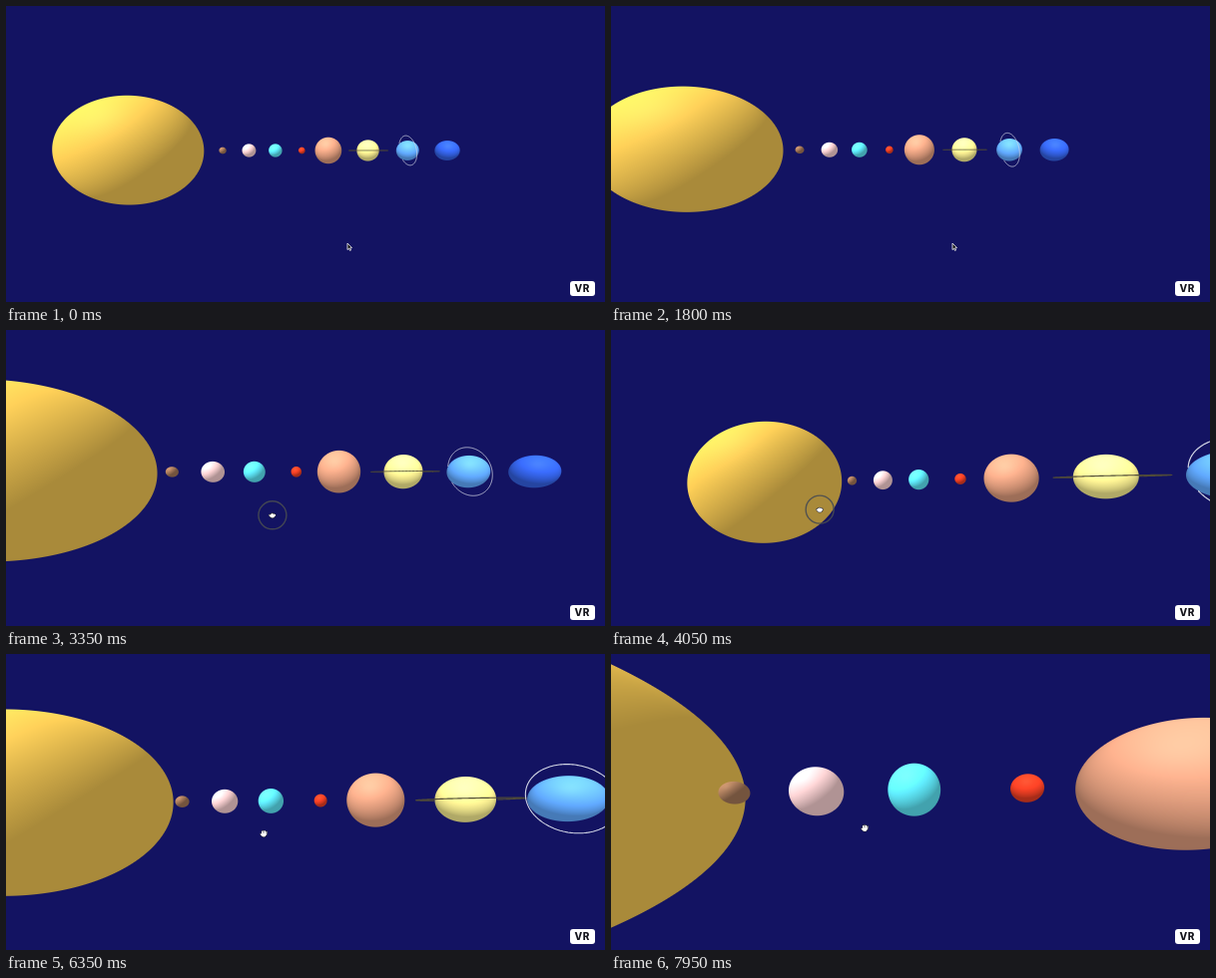
An HTML page with a canvas for the animation above (8000 ms loop, 600 px wide and 297 px high).

```html
<!DOCTYPE html>
<html lang="en">
<head>
<meta charset="utf-8">
<title>Solar system</title>
<style>
  html, body { margin: 0; width: 100%; height: 100%; overflow: hidden; background: #131362; }
  canvas { display: block; width: 600px; height: 297px; }
  #vr {
    position: absolute; left: 565px; top: 276px; width: 24.5px; height: 14.5px;
    border-radius: 3px; background: #fff; color: #15151c;
    font: 800 10px/14.5px Inter, Roboto, sans-serif; letter-spacing: .5px; text-align: center;
  }
</style>
</head>
<body>
<canvas id="stage" width="600" height="297"></canvas>
<div id="vr">VR</div>
<script>
const W = 600, H = 297, LOOP = 8000;
const FOCAL = H / 2 / Math.tan(40 * Math.PI / 180);
const HEIGHT = 0.2; // bodies sit slightly above the camera
const AMBIENT = .733, SUNLIGHT = .6, GLOSS = 10;
const ctx = document.getElementById('stage').getContext('2d');
const image = ctx.createImageData(W, H);
const words = new Uint32Array(image.data.buffer);

const rgb = hex => [1, 3, 5].map(i => parseInt(hex.slice(i, i + 2), 16));
const body = (r, hex) => ({ r, color: rgb(hex) });
const sun = body(1.985, '#e6bc4f'), saturn = body(.4, '#f0e68c'), uranus = body(.375, '#5fa6fa');
const bodies = [
  sun, body(.125, '#9e7355'), body(.25, '#f0c9ca'), body(.25, '#5added'), body(.125, '#e33c22'),
  body(.5, '#d69678'), saturn, uranus, body(.375, '#325edc'),
];
// Unit gaps up to the fifth planet, one and a half beyond it.
bodies.forEach((b, i) => b.x = i && Math.max(i + 2, 1.5 * i - .5));

// Camera and pointer: each move eases the named values to a new target.
const start = { x: 6.14, z: 6.7, yaw: 0, pitch: .01, handX: 342, handY: 239.4 };
const moves = [
  [50, 300, { x: 5.95 }],
  [300, 850, { x: 6.47 }],
  [950, 1800, { x: 6.706, z: 5.91 }],
  [2150, 2700, { x: 6.5, z: 4.72 }],
  [2850, 3200, { x: 6.3, z: 4.2, handX: 270.3, handY: 187.5 }],
  [3220, 4150, { yaw: -20.5, pitch: .056 }],
  [4150, 5060, { yaw: -.9, pitch: .017, handX: 281.8 }],
  [5060, 5450, { yaw: -7.65, pitch: .05 }],
  [5600, 6400, { x: 6.165, z: 3.44 }],
  [6500, 7300, { x: 5.6, z: 2.3, handX: 277.8, handY: 182 }],
  [7400, 7950, { x: 5.19, z: 1.676 }],
];

const clamp = (v, lo, hi) => Math.max(lo, Math.min(hi, v));
const ease = u => u * u * (3 - 2 * u);
const dot = (a, b) => a[0] * b[0] + a[1] * b[1] + a[2] * b[2];
const unit = a => { const n = Math.hypot(...a); return a.map(v => v / n); };
const project = p => [W / 2 + FOCAL * p[0] / p[2], H / 2 - FOCAL * p[1] / p[2]];

function stateAt(t) {
  const s = { ...start };
  for (const [from, to, target] of moves) {
    const u = ease(clamp((t - from) / (to - from), 0, 1));
    for (const key in target) s[key] += (target[key] - s[key]) * u;
  }
  return s;
}

// Turns a camera-relative point (right, up, forward) into view space.
function turner(yaw, pitch) {
  const cy = Math.cos(yaw), sy = Math.sin(yaw), cp = Math.cos(pitch), sp = Math.sin(pitch);
  return ([x, y, z]) => {
    const depth = x * sy + z * cy;
    return [x * cy - z * sy, y * cp - depth * sp, y * sp + depth * cp];
  };
}

// Screen range of a sphere along one axis.
function span(side, depth, r) {
  const mid = Math.atan2(side, depth), half = Math.asin(Math.min(1, r / Math.hypot(side, depth)));
  const edge = a => FOCAL * Math.tan(clamp(a, -1.55, 1.55));
  return [edge(mid - half), edge(mid + half)];
}

// Ray-traced sphere with softened edge.
function drawSphere({ r, color }, c, light) {
  if (c[2] <= r) return;
  const [left, right] = span(c[0], c[2], r), [low, high] = span(c[1], c[2], r);
  const x0 = clamp(Math.floor(W / 2 + left) - 1, 0, W), x1 = clamp(Math.ceil(W / 2 + right) + 1, 0, W);
  const y0 = clamp(Math.floor(H / 2 - high) - 1, 0, H), y1 = clamp(Math.ceil(H / 2 - low) + 1, 0, H);
  const [cx, cy, cz] = c, [lx, ly, lz] = light, k = dot(c, c) - r * r;
  const eye = unit(c), half = unit([lx - eye[0], ly - eye[1], lz - eye[2]]);
  for (let y = y0; y < y1; y++) for (let x = x0; x < x1; x++) {
    const dx = x + .5 - W / 2, dy = H / 2 - y - .5;
    const b = dx * cx + dy * cy + FOCAL * cz, dd = dx * dx + dy * dy + FOCAL * FOCAL;
    const disc = b * b - dd * k;
    const grad = 2 * Math.hypot(b * cx - dx * k, b * cy - dy * k);
    const cover = clamp(.5 + disc / grad, 0, 1);
    if (!cover) continue;
    const t = (b - Math.sqrt(Math.max(0, disc))) / dd;
    const nx = (dx * t - cx) / r, ny = (dy * t - cy) / r, nz = (FOCAL * t - cz) / r;
    const lit = AMBIENT + SUNLIGHT * Math.max(0, nx * lx + ny * ly + nz * lz);
    const gloss = GLOSS * Math.max(0, nx * half[0] + ny * half[1] + nz * half[2]) ** 20;
    const o = (y * W + x) * 4;
    for (let i = 0; i < 3; i++) {
      const v = Math.min(255, color[i] * lit + gloss);
      image.data[o + i] += (v - image.data[o + i]) * cover;
    }
  }
}

// Strokes the parts of a 3D ring that its sphere does not hide.
function drawRing(place, c, r, color, tube) {
  const k = dot(c, c) - r * r;
  const hidden = p => {
    const b = dot(p, c), dd = dot(p, p), disc = b * b - dd * k;
    return disc > 0 && (b - Math.sqrt(disc)) / dd < 1;
  };
  ctx.beginPath();
  let pen = false;
  for (let i = 0; i <= 180; i++) {
    const a = i * Math.PI / 90, p = place(Math.cos(a), Math.sin(a));
    const show = p[2] > .1 && !hidden(p);
    if (show) ctx[pen ? 'lineTo' : 'moveTo'](...project(p));
    pen = show;
  }
  ctx.strokeStyle = color;
  ctx.lineWidth = Math.max(.75, tube * FOCAL / c[2]);
  ctx.stroke();
}

function drawArrow(x, y) {
  ctx.fillStyle = '#111';
  ctx.strokeStyle = '#e4e4ea';
  ctx.lineWidth = .9;
  const arrow = new Path2D('M0 0V6.5L1.5 5.2 2.5 7.4 3.5 7 2.6 4.8 4.5 4.6Z');
  ctx.save();
  ctx.translate(x, y);
  ctx.fill(arrow);
  ctx.stroke(arrow);
  ctx.restore();
}

function drawHand(x, y, closed) {
  const reach = closed ? 1.6 : 3.4;
  ctx.lineCap = 'round';
  for (const [color, grow] of [['#22222c', .9], ['#fff', 0]]) {
    ctx.strokeStyle = ctx.fillStyle = color;
    ctx.lineWidth = 1.1 + grow;
    ctx.beginPath();
    ctx.ellipse(x, y + .8, 2.2 + grow / 2, 1.9 + grow / 2, 0, 0, 7);
    ctx.fill();
    ctx.beginPath();
    for (let i = -1.5; i < 2.5; i += 1.3) {
      ctx.moveTo(x + i, y + .5);
      ctx.lineTo(x + i * 1.1, y - reach + Math.abs(i) * .5);
    }
    ctx.moveTo(x - 1.5, y + 1.5);
    ctx.lineTo(x - 3, y);
    ctx.stroke();
  }
}

// The pointer follows the view while dragging.
function drawCursor(t, { handX, handY, yaw, pitch }) {
  const x = handX + 3.08 * yaw, y = handY - 135 * pitch;
  if (t < 3150) return drawArrow(x, y);
  const pressed = t >= 3200 && t < 5550;
  if (pressed) {
    ctx.beginPath();
    ctx.arc(x, y, 14, 0, 7);
    ctx.strokeStyle = 'rgba(72,75,82,.9)';
    ctx.lineWidth = 1.4;
    ctx.stroke();
  }
  drawHand(x, y, pressed);
}

function draw(t) {
  const s = stateAt(t);
  const turn = turner(s.yaw * Math.PI / 180, s.pitch);
  const view = (x, y, z) => turn([x - s.x, y + HEIGHT, s.z + z]);
  const light = turn([-1 / 3, 2 / 3, -2 / 3]);

  words.fill(0xff621313);
  for (const b of bodies) drawSphere(b, view(b.x, 0, 0), light);
  ctx.putImageData(image, 0, 0);

  drawRing((c, d) => view(saturn.x + .7 * c, .02 * d, .7 * d),
    view(saturn.x, 0, 0), saturn.r, '#4f4a38', .02);
  drawRing((c, d) => view(uranus.x - .09 * d, .56 * d, .56 * c),
    view(uranus.x, 0, 0), uranus.r, '#d3d7e6', .018);
  drawCursor(t, s);
}

function tick() {
  draw(performance.now() % LOOP);
  requestAnimationFrame(tick);
}
tick();
</script>
</body>
</html>
```
